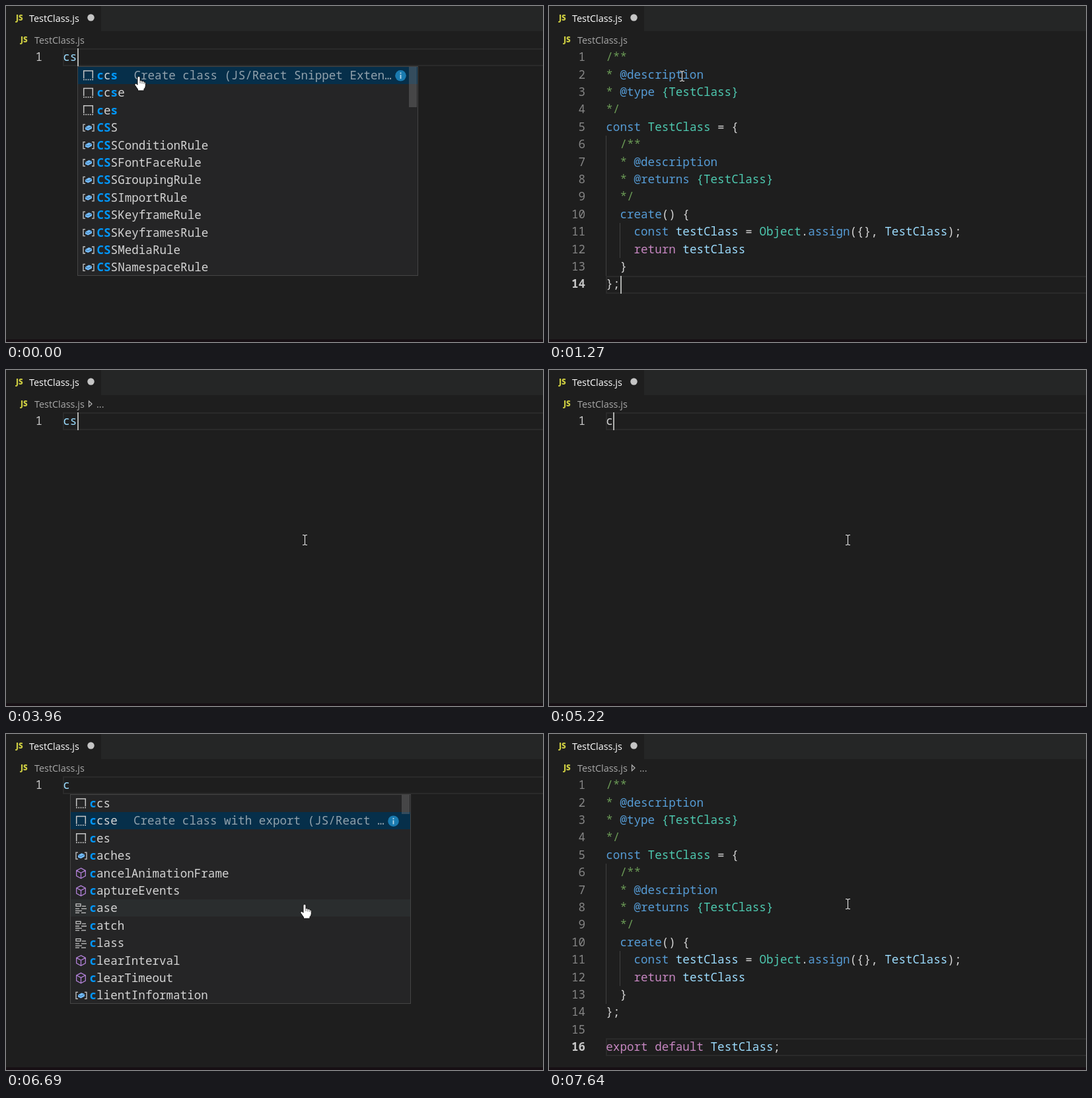
An HTML page with a canvas that plays this animation: 813x508 px, repeating every 8000 ms.

```html
<!DOCTYPE html>
<html lang="en">
<head>
<meta charset="utf-8">
<title>Snippet completion</title>
<style>
html, body { margin: 0; height: 100%; overflow: hidden; background: #1e1e1e; }
canvas { display: block; }
</style>
</head>
<body>
<canvas id="stage" width="813" height="508"></canvas>
<script>
const ctx = document.getElementById('stage').getContext('2d');
const LOOP = 8000, LEFT = 86.3, CHAR = 10.55, LINE = 26.4;
const MONO_FACE = '17.58px "Noto Sans Mono", monospace';
const MONO = '500 ' + MONO_FACE, MONO_BOLD = 'bold ' + MONO_FACE, MONO_SEMI = '600 ' + MONO_FACE;
const UI = '14.4px "Open Sans", sans-serif';
const BADGE = '800 11.5px "Open Sans", sans-serif';

// Each token starts with the letter of its colour.
const COLORS = { g: '#6a9955', b: '#569cd6', t: '#4ec9b0', w: '#d4d4d4', v: '#9cdcfe', p: '#c586c0' };
const CLASS_CODE = [
  'g/**',
  'g* |b@description',
  'g* |b@type |t{TestClass}',
  'g*/',
  'bconst |tTestClass |w= {',
  'g  /**',
  'g  * |b@description',
  'g  * |b@returns |t{TestClass}',
  'g  */',
  'b  create|w() {',
  'b    const |vtestClass |w= |tObject|w.|bassign|w({}, |vTestClass|w);',
  'p    return |vtestClass',
  'w  }',
  'w};'
];
const EXPORT_CODE = [...CLASS_CODE, 'w', 'pexport default |vTestClass|w;'];

// Each suggestion starts with the letter of its icon.
const CS_LIST = ['sccs', 'sccse', 'sces', ...['', 'ConditionRule', 'FontFaceRule', 'GroupingRule',
  'ImportRule', 'KeyframeRule', 'KeyframesRule', 'MediaRule', 'NamespaceRule'].map(n => 'vCSS' + n)];
const C_LIST = ['sccs', 'sccse', 'sces', 'vcaches', 'mcancelAnimationFrame', 'mcaptureEvents', 'kcase',
  'kcatch', 'kclass', 'mclearInterval', 'mclearTimeout', 'vclientInformation'];
const DETAILS = ['Create class (JS/React Snippet Exten…', 'Create class with export (JS/React …'];

const CARET_TOGGLES = [560, 1120, 1800, 2310, 2740, 3270, 3680, 3960, 4390, 4790, 5800, 6230, 6690, 7090, 7640];

const lineTop = row => Math.round(64.4 + row * LINE);

function box(x, y, w, h, color) {
  ctx.fillStyle = color;
  ctx.fillRect(x, y, w, h);
}
function text(str, x, y, color, font, align = 'left') {
  ctx.font = font;
  ctx.textAlign = align;
  ctx.fillStyle = color;
  ctx.fillText(str, x, y);
}
function shape(path, x, y, stroke, fill, width = 1.3) {
  ctx.save();
  ctx.translate(x, y);
  const p = new Path2D(path);
  if (fill) { ctx.fillStyle = fill; ctx.fill(p); }
  if (stroke) { ctx.strokeStyle = stroke; ctx.lineWidth = width; ctx.stroke(p); }
  ctx.restore();
}
function disc(x, y, r, color) {
  ctx.fillStyle = color;
  ctx.beginPath();
  ctx.arc(x, y, r, 0, 7);
  ctx.fill();
}

function drawFrame(crumb) {
  box(0, 0, 813, 508, '#1e1e1e');
  box(144, 0, 669, 38, '#252626');
  box(0, 504, 813, 4, '#170f14');
  text('JS', 15, 22, '#cbcb41', BADGE);
  text('TestClass.js', 35, 24, '#ffffff', '500 ' + UI);
  disc(128.5, 17.5, 5.2, '#c5c5c5');
  text('JS', 22, 55, '#cbcb41', BADGE);
  text('TestClass.js', 43, 57, '#a9a9a9', UI);
  if (crumb) {
    shape('M0 0L4.5 4.3L0 8.6Z', 125.5, 47, '#b4b4b4', null, 1.2);
    text('...', 137, 57, '#a9a9a9', UI);
  }
}

function drawCode(lines) {
  const last = lines.length - 1;
  ctx.strokeStyle = '#2a2a2a';
  ctx.lineWidth = 2;
  ctx.strokeRect(87, lineTop(last) + 1, 740, 25);
  if (last > 0) {
    box(86, 196, 1, 212, '#404040');
    box(107, 328, 1, 53, '#404040');
  }
  lines.forEach((line, row) => {
    const y = 83.2 + row * LINE, active = row === last;
    text(row + 1, 55, y, active ? '#c6c6c6' : '#858585', active && row ? MONO_SEMI : MONO, 'right');
    let col = 0;
    for (const token of line.split('|')) {
      const word = token.slice(1);
      text(word, LEFT + col * CHAR, y, COLORS[token[0]], MONO);
      col += word.length;
    }
  });
}

function drawIcon(kind, x, y) {
  const grey = '#c5c5c5';
  if (kind === 's') {
    shape('M9.7 4.5V-7H23.3V4.5', x, y, grey, null, 1.5);
    for (let i = 0; i < 5; i++) box(x + 9 + i * 3.3, y + 5.6, 1.8, 1.6, grey);
  } else if (kind === 'v') {
    shape('M12 -5H9V5H12M22 -5H25V5H22', x, y, grey);
    shape('M12 -1L17.5 -4L22 -2.3V1L16.3 4L12 2.2Z', x, y, null, '#75beff');
    shape('M12.3 -.7L16.3 1L21.7 -2', x, y, '#28567c', null, .8);
  } else if (kind === 'm') {
    shape('M16.5 -7.7L23.3 -4.2V4L16.5 7.7L9.7 4V-4.2ZM9.7 -4.2L16.5 -.6L23.3 -4.2M16.5 -.6V7.7', x, y, '#b180d7');
  } else {
    shape('M9 -6.5H16V-3H9ZM18 -3H24M8 .7H14M17 .7H25M8 3.9H18M8 7H14M17 7H24', x, y, grey);
  }
}

function drawPopup(x, list, query, selected, hovered, thumb) {
  box(x, 91, 516, 317, '#454545');
  box(x + 1, 92, 514, 315, '#252526');
  list.forEach((item, row) => {
    const top = Math.round(92 + row * LINE), y = 111 + row * LINE;
    if (row === selected) box(x + 1, top, 514, 26, '#062f4a');
    else if (row === hovered) box(x + 1, top, 514, 26, '#2a2d2e');
    drawIcon(item[0], x, y - 6);
    let matched = 0;
    const name = item.slice(1);
    [...name].forEach((ch, i) => {
      const hit = ch.toLowerCase() === query[matched];
      if (hit) matched++;
      text(ch, x + 29.5 + i * CHAR, y, hit ? '#0097fb' : '#d4d4d4', hit ? MONO_BOLD : MONO);
    });
    if (row === selected) {
      text(DETAILS[row], x + 53.8 + name.length * CHAR, y, '#91a1ac', MONO);
      disc(x + 489.5, y - 5.7, 8.3, '#1a7bb0');
      box(x + 488.6, y - 10.5, 1.8, 2, '#b5d6e8');
      box(x + 488.6, y - 7, 1.8, 6, '#b5d6e8');
    }
  });
  box(x + 502, 92, 12, thumb, 'rgba(121,121,121,.4)');
}

function drawPointer(x, y, hand) {
  if (hand) {
    shape('M-2 1.5Q0 -1 2 1.5V7Q4 5.8 5 7.8Q7 6.8 8 8.8Q10 8.2 10.3 10.5V15Q10 18 8 19.5V22H-1.5V20L-6 13.5Q-6.5 10.5 -4 11.2L-2 13.2Z',
      x, y, '#111111', '#ffffff', 1);
    shape('M2 7V11M5 8V11.5M8 9V12', x, y, '#333333', null, .8);
  } else {
    shape('M-3 -7.5H-1L.5 -6.5L2 -7.5H4M-3 7.5H-1L.5 6.5L2 7.5H4M.5 -6.5V6.5', x, y, '#e6e6e6', null, 1.1);
  }
}

function pointerAt(t) {
  const step = t < 1800 ? 0 : t < 2310 ? Math.min(4, Math.floor((t - 1800) / 120) + 1) : 5;
  const p = Math.sin(step / 5 * Math.PI / 2);
  return [Math.round(201 + 251 * p), Math.round(106 + 151 * p)];
}

function render(t) {
  const typed = t < 1270 || (t >= 3960 && t < 4790) ? 'cs'
    : (t >= 4790 && t < 4940) || (t >= 5220 && t < 7090) ? 'c' : '';
  const first = t < 1270, second = t >= 5370 && t < 7090;
  const lines = t >= 1270 && t < 3960 ? CLASS_CODE
    : t >= 7090 ? EXPORT_CODE
    : [(t >= 5220 && t < 5370 ? 'w' : 'v') + typed];

  drawFrame((t >= 1550 && t < 4250) || t >= 7500);
  drawCode(lines);

  const col = lines === CLASS_CODE ? 2 : lines === EXPORT_CODE ? 25 : typed.length;
  const caretOn = CARET_TOGGLES.filter(at => at <= t).length % 2 === 0;
  if (caretOn) box(Math.round(86.6 + col * CHAR), lineTop(lines.length - 1), 2, 27, '#aeafad');

  if (first) drawPopup(108, CS_LIST, 'cs', 0, 0, 61);
  if (second) drawPopup(97, C_LIST, 'c', t < 6540 ? 0 : 1, t < 5490 ? -1 : 6, 29);
  drawPointer(...pointerAt(t), first || (second && t >= 5490));
}

function tick() {
  render(performance.now() % LOOP);
  requestAnimationFrame(tick);
}
tick();
</script>
</body>
</html>
```
